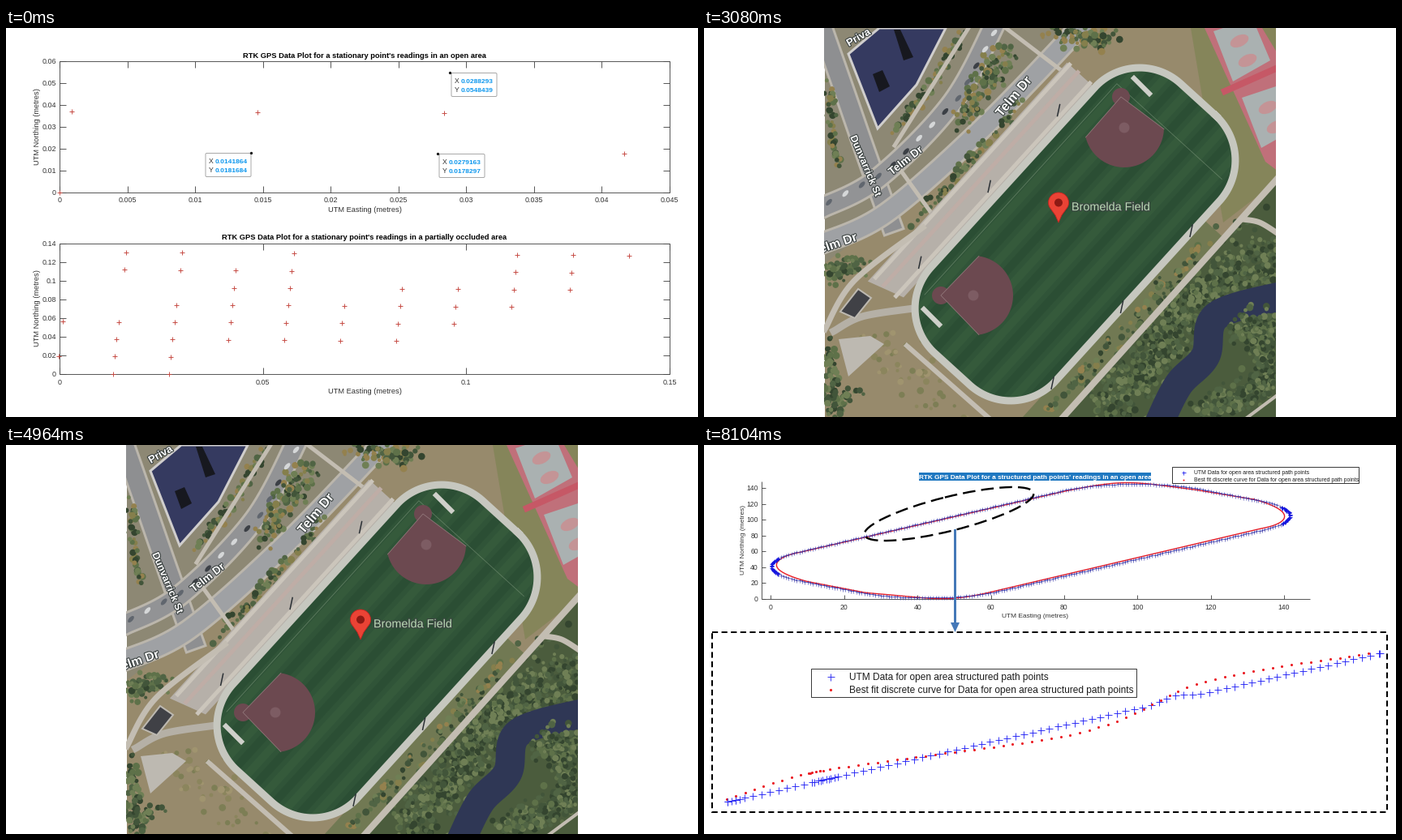
A matplotlib script for the animation above (9360 ms loop, 853 by 480 pixels).

```python
import matplotlib.pyplot as plt
import numpy as np
from matplotlib import patheffects
from matplotlib.animation import FuncAnimation
from matplotlib.collections import LineCollection
from matplotlib.patches import Ellipse, FancyBboxPatch, Polygon

W, H, DPI = 853, 480, 64
PT = 72 / DPI  # points per pixel
INK, AXIS = "#333333", "#484848"
STEP = 20
CUTS = (3080, 6220, 9360)

fig = plt.figure(figsize=(W / DPI, H / DPI), dpi=DPI, facecolor="white")


def label(ax, x, y, text, px, color=INK, ha="center", rot=0, **kw):
    """Text whose capitals are centred on the line through (x, y)."""
    drop, a = 0.36 * px, np.radians(rot)
    ax.text(x + drop * np.sin(a), y + drop * np.cos(a), text, color=color,
            family="Liberation Sans", fontsize=px * PT, ha=ha, va="baseline",
            rotation=rot, rotation_mode="anchor", zorder=3, **kw)


def shape(ax, pts, fill, edge="none", lw=0, zorder=2, **kw):
    return ax.add_patch(Polygon(pts, closed=True, fc=fill, ec=edge, lw=lw * PT,
                                zorder=zorder, **kw))


def rect(ax, l, t, r, b, fill, edge="none", lw=0, **kw):
    return shape(ax, [(l, t), (r, t), (r, b), (l, b)], fill, edge, lw, **kw)


def oval(ax, x, y, w, h, fill, angle=0):
    ax.add_patch(Ellipse((x, y), w, h, angle=angle, fc=fill, zorder=2))


def stroke(ax, pts, color, lw, **kw):
    return ax.plot(*np.transpose(pts), color=color, lw=lw * PT, zorder=2, **kw)[0]


def marks(ax, pts, marker, size, color, lw=1):
    ax.plot(*np.transpose(pts), ls="", marker=marker, ms=size * PT, mew=lw * PT,
            color=color, zorder=2)


def smooth(pts, n=16):
    """Open Catmull-Rom curve through the points."""
    p = np.array(pts, float)
    q = np.vstack([p[:1], p, p[-1:]])
    t = np.linspace(0, 1, n, endpoint=False)[:, None]
    parts = [b + 0.5 * ((c - a) * t + (2 * a - 5 * b + 4 * c - d) * t**2
                        + (3 * b - a - 3 * c + d) * t**3)
             for a, b, c, d in zip(q, q[1:], q[2:], q[3:])]
    return np.vstack(parts + [p[-1:]])


def evenly(curve, step):
    curve = np.array(curve, float)
    s = np.r_[0, np.cumsum(np.hypot(*np.diff(curve, axis=0).T))]
    at = np.arange(0, s[-1], step)
    return np.c_[np.interp(at, s, curve[:, 0]), np.interp(at, s, curve[:, 1])]


def between(pts, lo, hi):
    return pts[(pts[:, 0] > lo) & (pts[:, 0] < hi)]


def on_field(pts):
    """Sports ground coordinates (along, across) to the stage."""
    along, across = np.transpose(pts)
    c, s = np.cos(np.radians(47.7)), np.sin(np.radians(47.7))
    return np.c_[457.5 + c * along + s * across, 254.5 - s * along + c * across]


def rounded(half_len, half_wid, r, n=240):
    a = (np.arange(n + 1) + 0.5) * 2 * np.pi / n
    c, s = np.cos(a), np.sin(a)
    return np.c_[r * c + np.sign(c) * (half_len - r), r * s + np.sign(s) * (half_wid - r)]


RIM = on_field(rounded(225, 104, 75))


def plot_axes(ax, box, xs, x_step, ys, y_step, px, tick, full=True):
    l, t, r, b = box
    segs = [[(l, t), (l, b)], [(l, b), (r, b)]]
    segs += [[(x, b), (x, b - tick)] for x in xs] + [[(l, y), (l + tick, y)] for y in ys]
    if full:
        segs += [[(l, t), (r, t)], [(r, t), (r, b)]]
        segs += [[(x, t), (x, t + tick)] for x in xs] + [[(r, y), (r - tick, y)] for y in ys]
    ax.add_collection(LineCollection(segs, colors=AXIS, linewidths=0.9 * PT, zorder=1))
    for k, x in enumerate(xs):
        label(ax, x, b + 9.5, f"{k * x_step:g}", px)
    for k, y in enumerate(ys):
        label(ax, l - 4, y, f"{k * y_step:g}", px, ha="right")


def data_tip(ax, dot, x, y, side=1, up=-1):
    """Read-out of 56 by 29 px beside its dot."""
    l = dot[0] + 1.5 if side > 0 else dot[0] - 56.5
    t = dot[1] + 1
    ax.add_patch(FancyBboxPatch((l + 1.5, t + 1.5), 53, 26, zorder=2,
                                boxstyle="round,pad=1.5,rounding_size=1.5",
                                fc="white", ec="#a0a0a0", lw=0.9 * PT))
    for name, value, row in (("X", x, t + 9.5), ("Y", y, t + 20)):
        label(ax, l + 3.5, row, name, 8.6, ha="left")
        label(ax, l + 12, row, value, 8.35, "#0f98ee", "left", weight="bold")
    marks(ax, [dot], "o", 3, "#111111", 0.3)


def stationary(ax):
    red = "#c4443c"
    intro = "RTK GPS Data Plot for a stationary point's readings in "
    plot_axes(ax, (66, 41, 818, 202.5), np.linspace(66, 818, 10), 0.005,
              np.linspace(202.5, 41, 7), 0.01, 8.9, 8)
    plot_axes(ax, (66, 265.5, 818, 427), np.linspace(66, 818, 4), 0.05,
              np.linspace(427, 265.5, 8), 0.02, 8.9, 8)
    for top, place in ((33.5, "an open area"), (258, "a partially occluded area")):
        label(ax, 442, top, intro + place, 9.27, "black", weight="bold")
        label(ax, 442, top + 190, "UTM Easting (metres)", 9.3)
        label(ax, 37.5, top + 88, "UTM Northing (metres)", 9.3, rot=90)

    marks(ax, [(81, 102.5), (310.5, 103.5), (540.5, 104.5), (762.5, 155), (66, 202.5)],
          "+", 6, red, 0.9)
    data_tip(ax, (547.5, 54.5), "0.0288293", "0.0548439")
    data_tip(ax, (302.5, 153.5), "0.0141864", "0.0181684", side=-1)
    data_tip(ax, (532.5, 154.5), "0.0279163", "0.0178297")

    # readings fall on a slanted lattice
    rows = [(0, 1, 3, 7, 8, 9), (0, 1, 2, 3, 7, 8), (2, 3, 5, 6, 7, 8), range(1, 8),
            range(-1, 7), range(6), range(-1, 2), range(2)]
    marks(ax, [(148 - 2.3 * j + 68.9 * k, 277 + 21.4 * j + 0.4 * k)
               for j, row in enumerate(rows) for k in row], "+", 6, red, 0.9)


def aerial(ax):
    rng = np.random.default_rng(5)
    leafy = ["#34452f", "#42553a", "#506444", "#5e7149", "#6f7f55"]
    autumn = leafy + ["#857f4c", "#94814e"]
    pale = "#c3bdb2"

    def grove(pts, spread, n, tones=leafy):
        line = evenly(pts, 1)
        at = line[rng.integers(len(line), size=n)] + rng.normal(0, spread, (n, 2))
        ax.scatter(*at.T, s=(rng.uniform(4, 9, n) * PT) ** 2, c=rng.choice(tones, n),
                   linewidths=0, zorder=2)

    def way(pts, color, lw):
        stroke(ax, smooth(pts), color, lw)

    # ground
    rect(ax, 149, 0, 705, 480, "#978a6c")
    shape(ax, [(149, 0), (460, 0), (300, 180), (149, 290)], "#8d8874")
    shape(ax, [(600, 0), (705, 0), (705, 190), (640, 240)], "#85855a")
    shape(ax, on_field([(-260, 104), (120, 104), (120, 141), (-260, 141)]), "#717953")
    shape(ax, on_field([(-260, 141), (280, 141), (280, 420), (-260, 420)]), "#4b5c3d")

    # streets
    side = [(144, -5), (172, 75), (198, 150), (230, 240)]
    near = [(145, 222), (215, 185), (306, 92), (362, -12)]
    far = [(145, 266), (225, 228), (345, 122), (472, -10)]
    for pts, gray in ((side, "#8e8f91"), (near, "#929395"), (far, "#9fa1a4")):
        way(pts, "#bbb6ac", 28)
        way(pts, gray, 22)
    grove([(375, 30), (335, 75), (322, 115)], 8, 130, autumn)
    grove([(430, 5), (500, 15)], 8, 80, autumn)
    grove([(318, 5), (285, 65), (235, 125)], 4, 80, autumn)
    grove([(152, 65), (165, 170)], 4, 50, autumn)
    grove(on_field([(-130, -157), (70, -157)]), 4, 70, autumn)
    for start, end in (((326, 0), (235, 145)), ((372, 0), (440, 52)), ((242, 175), (285, 235))):
        way([start, end], pale, 5)
    for x, y in evenly(near, 23) + [9, -7]:
        oval(ax, x, y, 10, 5, rng.choice(["#d5d7d8", "#3c4046", "#60666e"]), -48)

    # roof
    shape(ax, [(178, 32), (216, 0), (298, 0), (262, 70), (214, 124)], "#353a60", "#d0cecd", 3)
    shape(ax, [(234, 2), (242, 2), (258, 36), (246, 40)], "#17181f")
    shape(ax, [(208, 57), (220, 52), (229, 72), (216, 79)], "#17181f")

    # promenade
    shape(ax, on_field([(-215, -150), (150, -150), (150, -104), (-200, -104)]), "#b6b0a9")
    for across, color in ((-146, "#cbc5bb"), (-132, "#bfada6"), (-112, "#cbc5bb")):
        stroke(ax, on_field([(-205, across), (150, across)]), color, 5)

    # courts
    shape(ax, [(617, 0), (688, 0), (712, 40), (712, 180), (692, 165)], "#c0707a")
    for x, y in ((628, 4), (663, 86)):
        shape(ax, [(x, y), (x + 48, y - 16), (x + 70, y + 36), (x + 24, y + 62)], "#aab1b1")
        for k in (0, 1):
            oval(ax, x + 32 + 10 * k, y + 12 + 24 * k, 24, 14, "#c49496", -25)
    stroke(ax, [(642, 78), (705, 50)], "#c65866", 8)

    # south-west corner
    grove([(155, 300), (190, 290)], 8, 70)
    grove([(154, 395), (158, 470), (190, 445)], 6, 100)
    grove([(215, 385), (300, 470)], 14, 50, ["#8b855d", "#a0946f", "#7d7e55"])
    way([(149, 372), (185, 312), (270, 246)], pale, 7)
    way([(160, 374), (195, 356), (258, 346)], "#b5b0a6", 9)
    shape(ax, [(166, 384), (205, 380), (222, 390), (178, 430)], "#bdb9b1")
    shape(ax, [(168, 350), (190, 322), (206, 333), (186, 358)], "#404146", "#bdb9b1", 2)
    way([(250, 392), (352, 482)], pale, 6)

    # river and woods
    grove([(700, 275), (600, 335), (555, 400), (500, 465)], 19, 850)
    way([(560, 490), (585, 440), (618, 405), (632, 355), (715, 330)], "#2f3755", 36)
    grove([(655, 375), (695, 365), (690, 440), (620, 472)], 9, 420)
    grove(on_field([(-190, 123), (110, 123)]), 4, 80, autumn)
    stroke(ax, on_field([(-190, 141), (240, 138)]), pale, 8)
    way([(664, 236), (685, 240), (708, 254)], pale, 7)
    way([(665, 484), (708, 452)], pale, 4)

    # sports ground
    turf = shape(ax, RIM, "#305438")
    for k in range(-6, 7):
        stroke(ax, on_field([(-230, 16 * k), (230, 16 * k)]),
               "#426a46" if k % 2 else "#21402a", 10, alpha=0.28).set_clip_path(turf)
    stroke(ax, on_field([(-180, -87), (172, -87), (172, 88)]), "#8fa68a", 0.8, alpha=0.5)
    for home, mound in (((514, 85), (518, 123)), ((292, 330), (332, 330))):
        (hx, hy), (mx, my) = home, mound
        a = np.arctan2(hy - my, hx - mx) + np.radians(np.linspace(98, 262, 40))
        arc = np.c_[mx + 49 * np.cos(a), my + 49 * np.sin(a)]
        oval(ax, hx, hy, 22, 22, "#6c4950")
        shape(ax, np.vstack([[home], arc]), "#6c4950")
        stroke(ax, [arc[0], home, arc[-1]], "#92777a", 0.8)
        oval(ax, mx, my, 13, 13, "#7d5c63")
    stroke(ax, RIM, "#c6c7bf", 9)
    for x, y in ((530, 62), (271, 347)):
        stroke(ax, [(x, y), (x + 19, y + 19)], "#cfd0ca", 6)
    for along in (-155, -28, 99):
        for x, y in on_field([(along, -117), (along, 104)]):
            stroke(ax, [(x - 2, y + 6), (x + 1, y - 8)], "#2a2f34", 1.5)

    # map labels
    def tag(x, y, text, px, rot=0, color="white", ha="center", **kw):
        halo = patheffects.withStroke(linewidth=2.2 * PT, foreground="#3a4140")
        label(ax, x, y, text, px, color, ha, rot, path_effects=[halo], **kw)

    tag(381, 84, "Telm Dr", 16.3, 50, weight="bold")
    tag(248, 163, "Telm Dr", 13.6, 38, weight="bold")
    tag(161, 266, "Telm Dr", 15.6, 19, weight="bold")
    tag(200, 170, "Dunvarrick St", 12.4, -67, weight="bold")
    tag(190, 11, "Priva", 13, 30, weight="bold")
    tag(453, 220, "Bromelda Field", 14.4, color="#b9dcb4", ha="left")
    a = np.radians(np.linspace(155, 385, 40))
    pin = np.c_[437 + 12.5 * np.cos(a), 215.5 + 12.5 * np.sin(a)]
    shape(ax, np.vstack([pin, [(441, 231), (437, 240), (433, 231)]]), "#ea4335", "#c5221f", 0.8)
    oval(ax, 437, 215.5, 10, 10, "#8e1a14")

    for l, r in ((0, 148.5), (705, W)):
        rect(ax, l, 0, r, H, "white", zorder=5)


def legend(ax, box, x_mark, x_text, rows, px, plus, dot):
    rect(ax, *box, "white", "#3c3c3c", 1)
    marks(ax, [(x_mark, rows[0])], "+", plus, "#2a2af0", 0.9)
    marks(ax, [(x_mark, rows[1])], "o", dot, "#ee2222", 0)
    tail = "open area structured path points"
    for y, head in zip(rows, ("UTM Data for ", "Best fit discrete curve for Data for ")):
        label(ax, x_text, y, head + tail, px, "#1c1c1c", "left")


def structured(ax):
    blue, red, arrow = "#2424f4", "#ea1c24", "#4478b8"
    plot_axes(ax, (71, 45, 747, 190), np.linspace(82.5, 715, 8), 20,
              np.linspace(189.5, 53, 8), 20, 8.6, 5, full=False)
    label(ax, 408.5, 210, "UTM Easting (metres)", 8.35)
    label(ax, 46.5, 117.5, "UTM Northing (metres)", 8.35, rot=90)
    rect(ax, 265, 33.5, 551, 44, "#1f78c1")
    label(ax, 408, 39, "RTK GPS Data Plot for a structured path points' readings in an open area",
          8.25, "white", weight="bold")
    legend(ax, (577, 26.5, 807.5, 47), 591, 604, (33.5, 42.5), 6.83, 5, 2)

    # the walked path is the rim of the sports ground, flattened by the axes
    low, high = RIM.min(axis=0), RIM.max(axis=0)
    lap = (RIM - low) / (high - low) * [639, 140.5] + [83, 48]
    fit = lap.copy()
    fit[:, 0] = 402.5 + 0.98 * (lap[:, 0] - 402.5)
    fit[:, 1] -= 1.5 * np.cos(2 * np.pi * (fit[:, 0] - 232) / 143)
    stroke(ax, fit, red, 1.4)
    marks(ax, evenly(lap, 3.4), "+", 5, "#3434a8", 0.6)
    dense = evenly(lap, 1.5)
    for lo, hi in ((0, 92), (712, W)):
        marks(ax, between(dense, lo, hi), "+", 5, "#1414e0", 0.9)

    # callout
    ax.add_patch(Ellipse((302, 85), 215, 42, angle=-14, fill=False, ec="black",
                         lw=2.4 * PT, ls=(0, (6.5, 3)), zorder=2))
    stroke(ax, [(309.5, 105), (309.5, 222)], arrow, 3)
    shape(ax, [(304, 219), (315, 219), (309.5, 231)], arrow)
    rect(ax, 10.5, 230.5, 842.5, 452.5, "none", "black", 2, ls=(0, (3.6, 2.2)))
    legend(ax, (132.5, 276, 533.5, 311), 156, 179, (286, 302), 11.9, 9, 3.2)

    # straight walk with one bump, and the curve that weaves around it
    x = np.linspace(29, 833, 400)
    walk = np.c_[x, 440 - 183 * (x - 29) / 804 - 5 * np.exp(-((x - 581) / 21) ** 2)]
    weave = smooth([(28, 437), (125, 406), (270, 384), (417, 364), (491, 347),
                    (545, 324), (601, 297), (689, 277), (826, 256.5)])
    marks(ax, np.vstack([evenly(walk, 10.7), walk[-1:]]), "+", 9, blue, 0.9)
    marks(ax, evenly(weave, 12), "o", 3.1, red, 0)
    for lo, hi in ((28, 46), (134, 162)):
        marks(ax, between(evenly(walk, 5), lo, hi), "+", 9, blue, 0.9)
    marks(ax, between(evenly(weave, 4.8), 124, 152), "o", 3.1, red, 0)


def still(scene):
    ax = fig.add_axes([0, 0, 1, 1], xlim=(0, W), ylim=(H, 0))
    ax.axis("off")
    ax.set_autoscale_on(False)
    scene(ax)
    fig.canvas.draw()
    pixels = np.array(fig.canvas.buffer_rgba())
    ax.remove()
    return pixels


# each scene is static, so it is rendered once and then shown by time
stills = [still(scene) for scene in (stationary, aerial, structured)]
screen = fig.figimage(stills[0])


def update(i):
    screen.set_data(stills[np.searchsorted(CUTS, i * STEP, side="right")])
    return [screen]


anim = FuncAnimation(fig, update, frames=CUTS[-1] // STEP, interval=STEP,
                     repeat=True, repeat_delay=0)
plt.show()
```
